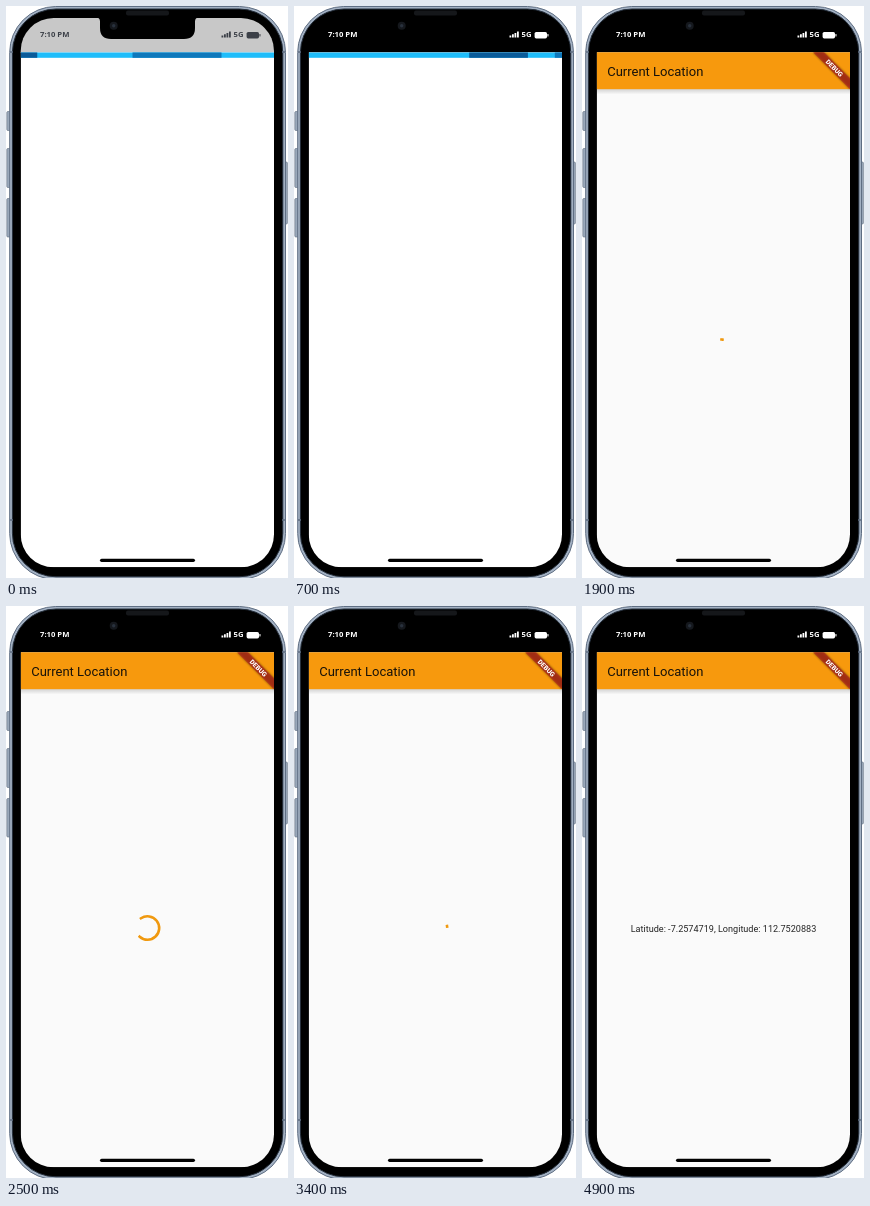
Recreate the animation shown at these times as an HTML page. Size 282 px wide and 572 px high, loop 5400 ms.

```html
<!DOCTYPE html>
<html lang="en">
<head>
<meta charset="utf-8">
<title>Current Location</title>
<style>
  html, body { margin: 0; width: 100%; height: 100%; overflow: hidden; background: #fff; }
  svg { display: block; width: 282px; height: 572px; }
  .status { fill: #fff; font: 700 7.700px "Open Sans", sans-serif; }
  .status.dim { fill: #3c4048; }
  .roboto { font-family: Roboto, sans-serif; }
</style>
</head>
<body>
<svg viewBox="0 0 282 572">
  <defs>
    <clipPath id="screen"><rect x="14.700" y="12" width="253.300" height="549.300" rx="33"/></clipPath>
    <clipPath id="page"><rect x="14.700" y="46.300" width="253.300" height="515"/></clipPath>
    <linearGradient id="drop" x2="0" y2="1">
      <stop offset="0" stop-opacity=".16"/>
      <stop offset="1" stop-opacity="0"/>
    </linearGradient>
    <filter id="blur" x="-20%" y="-80%" width="140%" height="260%"><feGaussianBlur stdDeviation="1.6"/></filter>
  </defs>

  <g fill="#9aa8ba" stroke="#5f6d80" stroke-width=".6">
    <rect x=".8" y="105.500" width="4" height="19" rx="1"/>
    <rect x=".8" y="142.500" width="4" height="39" rx="1"/>
    <rect x=".8" y="192.500" width="4" height="38.500" rx="1"/>
    <rect x="278" y="156" width="3.400" height="62" rx="1"/>
  </g>
  <rect x="3.700" y=".5" width="275.800" height="573" rx="46" fill="#a3b1c3" stroke="#5f6e83"/>
  <rect x="6.400" y="3" width="270.400" height="567.800" rx="43.500" stroke="#26303d"/>
  <path d="M4 46h3M4 514h3M276 46h3M276 514h3" stroke="#5d6c80" stroke-width="1.500"/>

  <g clip-path="url(#screen)">
    <rect id="statusBg" x="14" y="12" width="255" height="35" fill="#c8c8c8"/>
    <g clip-path="url(#page)">
      <rect id="pageBg" x="14" y="46" width="255" height="516" fill="#fff"/>
      <g id="loader">
        <rect x="14" y="46.300" width="255" height="5.500" fill="#1fbdfa"/>
        <rect id="first" y="46.300" height="5.500" fill="#0f78bb"/>
        <rect id="second" y="46.300" height="5.500" fill="#0a5b99"/>
      </g>
      <g id="app">
        <rect x="14" y="83" width="255" height="5.500" fill="url(#drop)"/>
        <rect x="14" y="46" width="255" height="37.200" fill="#f7990d"/>
        <text class="roboto" x="25.200" y="69.900" font-size="13" fill="#17120a">Current Location</text>
        <g transform="translate(268 46.500) rotate(45) scale(.649)">
          <rect x="-40" y="28" width="80" height="12" opacity=".5" filter="url(#blur)"/>
          <rect x="-40" y="28" width="80" height="12" fill="#b71c1c" fill-opacity=".63"/>
          <text class="roboto" y="37.600" font-size="10.200" font-weight="900" text-anchor="middle" fill="#fff">DEBUG</text>
        </g>
        <path id="spinner" fill="none" stroke="#f0990f" stroke-width="2.600" stroke-linecap="square"/>
        <text id="position" class="roboto" x="141.500" y="325.900" font-size="9.100" text-anchor="middle" fill="#242424">Latitude: -7.2574719, Longitude: 112.7520883</text>
      </g>
    </g>
  </g>

  <path d="M90 11.500q4 0 4 4V22q0 11 11 11h73q11 0 11-11v-6.500q0-4 4-4z"/>
  <rect x="120" y="4.500" width="43" height="5" rx="2" fill="#15171a"/>
  <circle cx="107.700" cy="19.700" r="4" fill="#15181d"/>
  <circle cx="107.700" cy="19.700" r="1.700" fill="#29313d"/>

  <g id="status" class="status">
    <text x="34" y="31">7:10 PM</text>
    <path d="M215.500 31.500v-2h1.800v2zm2.500 0v-3.200h1.800v3.200zm2.500 0v-4.600h1.800v4.600zm2.500 0v-6h1.800v6z"/>
    <text x="227.600" y="31.400">5G</text>
    <rect x="240.600" y="26" width="12.400" height="6.400" rx="1.600"/>
    <rect x="253.400" y="28" width="1.100" height="2.400" rx=".5"/>
  </g>
  <rect x="94" y="552.700" width="95" height="3.200" rx="1.600"/>
</svg>
<script>
  const LOOP = 5400, APP_START = 1000, FOUND = 3800;
  const loaderTimes = [0, 200, 300, 400, 500, 700];
  const el = id => document.getElementById(id);
  const show = (id, on) => el(id).setAttribute("display", on ? "inline" : "none");
  const clamp = v => Math.min(1, Math.max(0, v));

  // CSS-style cubic-bezier timing, solved by bisection
  function cubic(x1, y1, x2, y2) {
    const at = (a, b, s) => 3 * a * s * (1 - s) ** 2 + 3 * b * s * s * (1 - s) + s ** 3;
    return x => {
      let lo = 0, hi = 1;
      for (let i = 0; i < 24; i++) {
        const mid = (lo + hi) / 2;
        if (at(x1, x2, mid) < x) lo = mid; else hi = mid;
      }
      return at(y1, y2, lo);
    };
  }
  const easeOut = cubic(0, 0, .58, 1);
  const easeIn = cubic(.42, 0, 1, 1);
  const standard = cubic(.4, 0, .2, 1);

  function placeBar(id, from, p) {
    el(id).setAttribute("x", 15 + 253 * (from + (1 - from) * p));
    el(id).setAttribute("width", 253 * (1 - .9 * p));
  }

  function drawLoader(t) {
    const held = loaderTimes.filter(v => v <= t).pop();
    const progress = (1068 + held * 750 / 700) / 2000;
    placeBar("first", -1, easeOut(progress));
    placeBar("second", -1.5, easeIn(progress));
  }

  // Material indeterminate circle: a 1333 ms stroke cycle on a 2222 ms rotation
  function drawSpinner(t) {
    const elapsed = .99 * t - 662;
    const phase = elapsed / 1333 % 1;
    const head = standard(clamp(phase * 2));
    const tail = standard(clamp(phase * 2 - 1));
    const start = 2 * Math.PI * (-.25 + .75 * tail + elapsed / 2222 + .25 * phase);
    const sweep = Math.max(1.5 * Math.PI * (head - tail), .001);
    const r = 11.7;
    const point = a => `${141.5 + r * Math.cos(a)} ${322 + r * Math.sin(a)}`;
    el("spinner").setAttribute("d",
      `M${point(start)}A${r} ${r} 0 ${sweep > Math.PI ? 1 : 0} 1 ${point(start + sweep)}`);
  }

  function render(now) {
    const t = Math.floor(Math.max(0, now - began) % LOOP / 100) * 100;
    const running = t >= APP_START, found = t >= FOUND;
    el("statusBg").setAttribute("fill", t < 200 ? "#c8c8c8" : "#000");
    el("status").classList.toggle("dim", t < 200);
    el("pageBg").setAttribute("fill", running ? "#fafafa" : "#fff");
    show("loader", !running);
    show("app", running);
    show("spinner", !found);
    show("position", found);
    if (!running) drawLoader(t);
    else if (!found) drawSpinner(t);
    requestAnimationFrame(render);
  }
  const began = performance.now();
  render(began);
</script>
</body>
</html>
```
